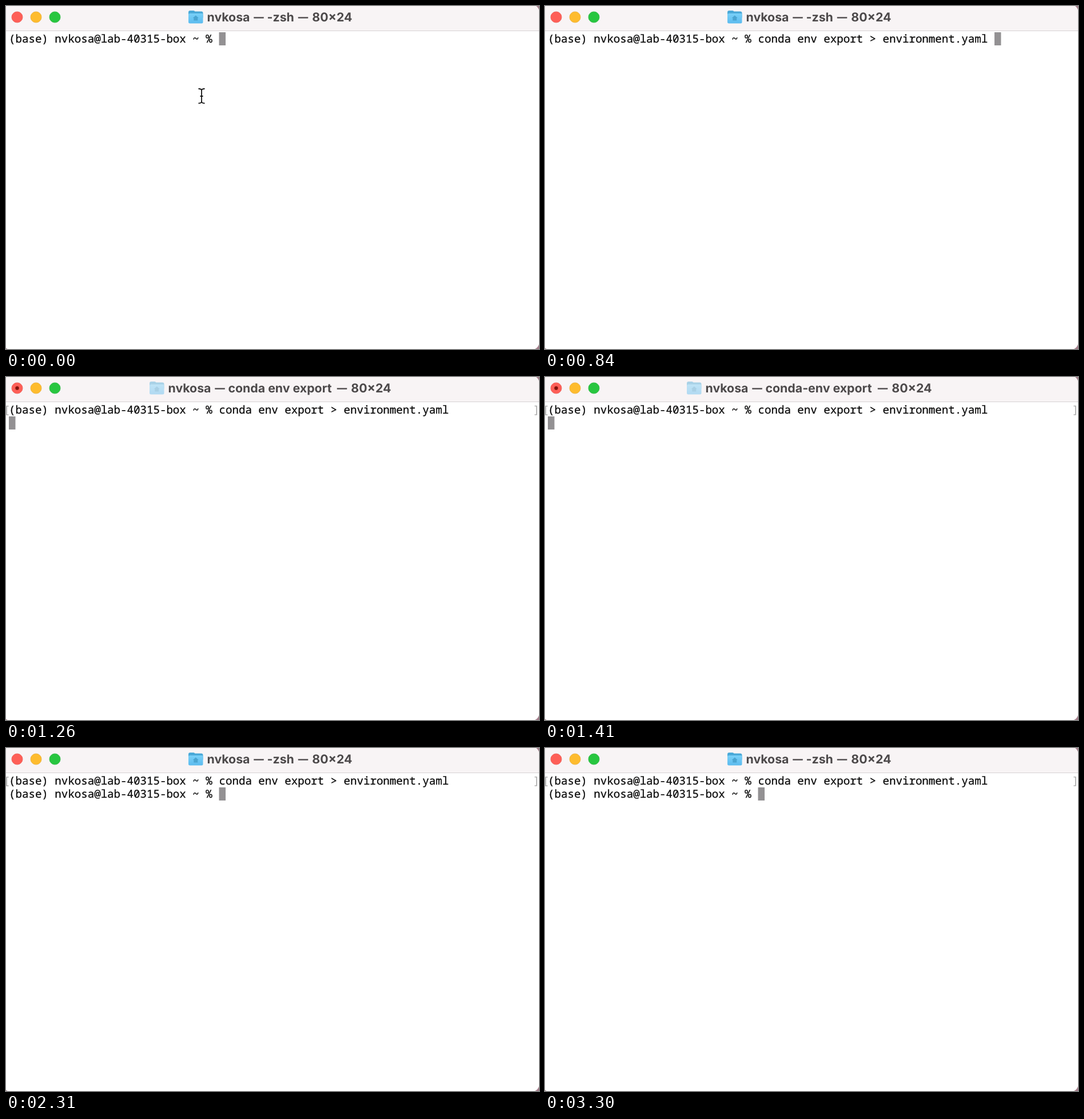
Animation of 932 by 601 pixels, one loop 3.99 s. Source, as an HTML page:

```html
<!DOCTYPE html>
<html lang="en">
<head>
<meta charset="utf-8">
<title>Terminal</title>
<style>
  html, body { margin: 0; width: 100%; height: 100%; overflow: hidden; background: #fff; }
  svg { display: block; width: 932px; height: 601px; }
  text { text-rendering: geometricPrecision; }
  .mono { font: 500 19.14px "Noto Sans Mono", monospace; fill: #0b0b0b; }
  .line { stroke: #0b0b0b; stroke-width: 0.3px; }
  .selected { fill: #fff; stroke: #fff; }
  .bracket { font-weight: 300; fill: #a9a9a9; text-anchor: middle; }
  .title { font: 700 21.3px Inter, sans-serif; font-optical-sizing: none; fill: #4c494a; }
  .dash { font: 700 17px "Liberation Sans", sans-serif; stroke: #4c494a; stroke-width: 0.5px; }
  .middle { text-anchor: middle; }
  .end { text-anchor: end; }
</style>
</head>
<body>
<svg viewBox="0 0 932 601">
  <defs>
    <clipPath id="window"><rect x="-5" y="-2" width="937.5" height="604" rx="13"/></clipPath>
    <linearGradient id="folderFront" x2="0" y2="1">
      <stop stop-color="#79d0f8"/><stop offset="1" stop-color="#5cbbee"/>
    </linearGradient>
  </defs>
  <rect width="932" height="601" fill="#a47f8c"/>
  <g clip-path="url(#window)">
    <rect width="932" height="601" fill="#fff"/>
    <rect width="932" height="43" fill="#f8f4f5"/>
    <rect y="43" width="932" height="1" fill="#d6d1d3"/>

    <g stroke-width="1">
      <circle cx="19.5" cy="19.5" r="9.5" fill="#fe5f57" stroke="#f0645d"/>
      <circle cx="52.5" cy="19.5" r="9.5" fill="#febc2e" stroke="#eeb440"/>
      <circle cx="85.5" cy="19.5" r="9.5" fill="#28c640" stroke="#36bd4a"/>
    </g>
    <circle id="busyDot" cx="19.5" cy="19.5" r="3.2" fill="#81120c"/>

    <g id="folder">
      <path d="M0 11q0-3 3-3h6q1.500 0 2.500 1.500h11q3 0 3 3v8H0z" fill="#4aa9d8"/>
      <rect y="13" width="25.500" height="17.500" rx="2.500" fill="url(#folderFront)"/>
      <path d="M12.750 16.500l5 4.500h-1.500v4.500h-7V21h-1.500z" fill="#4aa5d2"/>
    </g>
    <g class="title">
      <text id="user" class="middle" y="26.500"></text>
      <text id="dashLeft" class="dash middle" y="25">—</text>
      <text id="process" y="26.500"></text>
      <text id="dashRight" class="dash middle" y="25">—</text>
      <text id="size" class="end" y="26.500">80×24</text>
    </g>

    <rect id="selection" y="46" height="23" fill="#000"/>
    <rect id="caret" width="11.500" height="23" fill="#939193"/>
    <g class="mono">
      <text id="prompt1" class="line" x="5" y="64.300"></text>
      <text id="command" class="line" y="64.300"></text>
      <text id="prompt2" class="line" x="5" y="87.300"></text>
      <g id="brackets">
        <text class="bracket" x="1.500" y="64">[</text>
        <text class="bracket" x="927.500" y="64">]</text>
      </g>
    </g>
    <path id="pointer" d="M336.500 145q5.500 0 5.500 3q0-3 5.500-3M342 148v19M336.500 170.500q5.500 0 5.500-3.500q0 3.500 5.500 3.500M339.500 158h5"
          fill="none" stroke="#161616" stroke-width="1.800"/>
  </g>
</svg>
<script>
const LOOP = 3990, LEFT = 5, COLUMN = 11.484, ROW = 23;
const USER = "nvkosa";
const PROMPT = `(base) ${USER}@lab-40315-box ~ %`;
const COMMAND = "conda env export > environment.yaml";
const PASTE = 570, DESELECT = 840, ENTER = 1140, RUN = 1200, SUBCOMMAND = 1350, DONE = 2220, IDLE = 2250;

const el = id => document.getElementById(id);
const set = (id, name, value) => el(id).setAttribute(name, value);
const show = (id, visible) => set(id, "visibility", visible ? "visible" : "hidden");
const columnX = column => LEFT + column * COLUMN;

const commandColumn = PROMPT.length + 1;
const commandEnd = commandColumn + COMMAND.length + 1;

el("user").textContent = USER;
el("prompt1").textContent = el("prompt2").textContent = PROMPT;
el("command").textContent = COMMAND;
set("command", "x", columnX(commandColumn));
set("selection", "x", columnX(commandColumn));
set("selection", "width", columnX(commandEnd) - columnX(commandColumn));

// The title is centred on x = 462, so its left edge fixes the right one.
function drawTitle(left, process) {
  const right = 924 - left;
  set("folder", "transform", `translate(${left})`);
  set("user", "x", left + 70);
  set("dashLeft", "x", left + 123);
  set("process", "x", left + 137.5);
  set("dashRight", "x", right - 85.5);
  set("size", "x", right + 0.5);
  el("process").textContent = process;
}

function placeCaret(column, row) {
  set("caret", "x", columnX(column));
  set("caret", "y", 46 + row * ROW);
}

function render(t) {
  const pasted = t >= PASTE, selected = pasted && t < DESELECT;
  const entered = t >= ENTER, done = t >= DONE;
  const running = t >= RUN && t < IDLE;

  show("command", pasted);
  show("selection", selected);
  el("command").classList.toggle("selected", selected);
  show("pointer", t < DESELECT);
  show("brackets", entered);
  show("prompt2", done);
  show("busyDot", running);
  set("folder", "opacity", running ? 0.45 : 1);

  if (!running) drawTitle(319, "-zsh");
  else if (t < SUBCOMMAND) drawTitle(251, "conda env export");
  else drawTitle(248, "conda-env export");

  if (done) placeCaret(commandColumn, 1);
  else if (entered) placeCaret(0, 1);
  else placeCaret(pasted ? commandEnd : commandColumn, 0);
}

const start = performance.now();
function tick() {
  render((performance.now() - start) % LOOP);
  requestAnimationFrame(tick);
}
tick();
</script>
</body>
</html>
```
